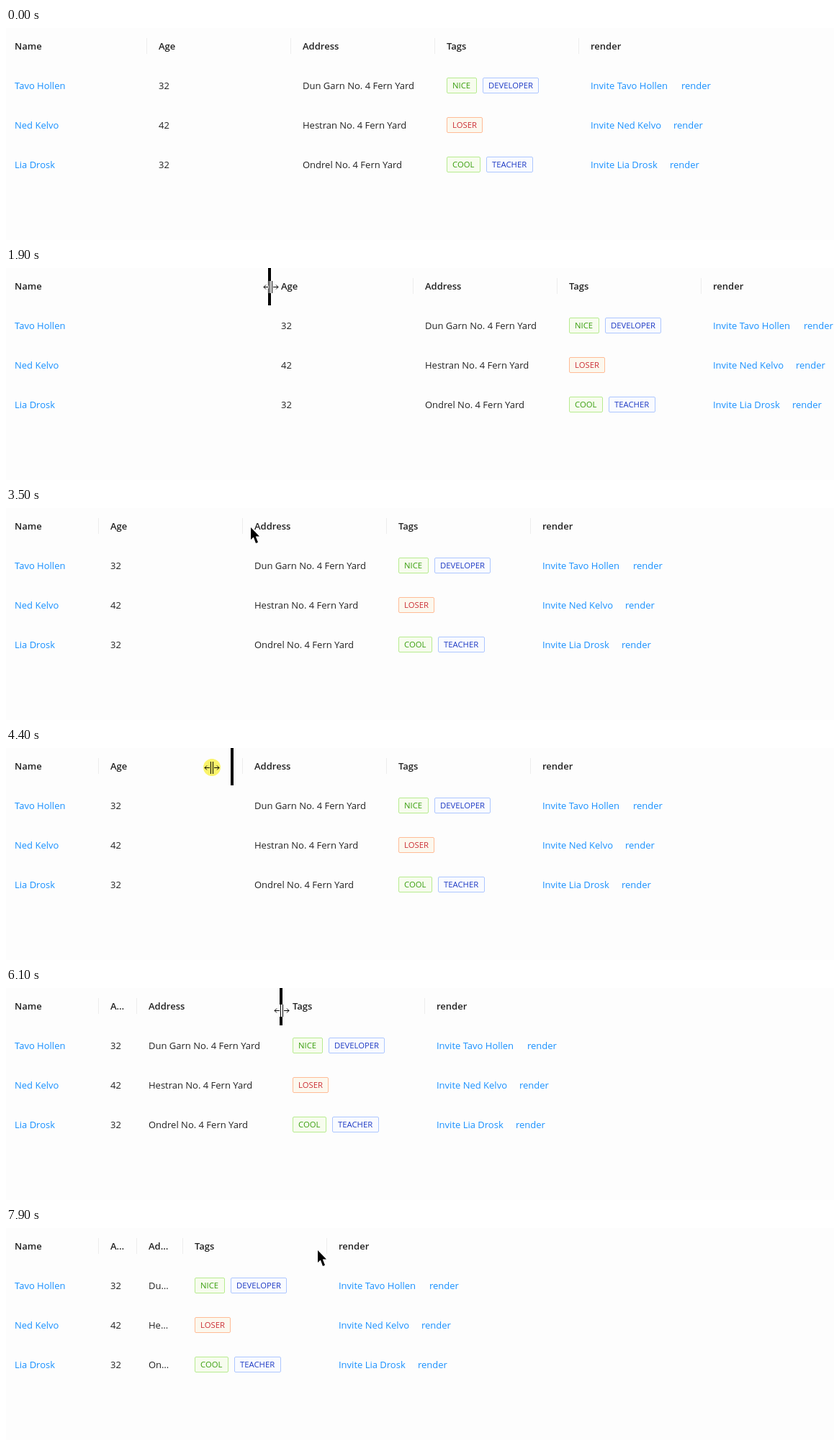
Write an HTML page that moves like this. It is 1150 px wide and 295 px high and loops after 8000 ms.

```html
<!DOCTYPE html>
<html lang="en">
<head>
<meta charset="utf-8">
<title>Resizable table columns</title>
<style>
html, body { margin: 0; width: 100%; height: 100%; overflow: hidden; background: #fdfdfd; }
body { position: relative; font: 13px/22px "Open Sans", "Noto Sans", sans-serif; color: #222; }
.column { position: absolute; top: 0; height: 100%; }
.cell { position: absolute; left: 16px; right: 16px; overflow: hidden; white-space: nowrap; text-overflow: ellipsis; }
.head { font-weight: 600; }
.column:not(:last-of-type)::after { content: ""; position: absolute; right: 0; top: 14px; width: 1px; height: 22px; background: #ededed; }
.link { color: #1890ff; }
.invite { display: inline-block; margin-right: 16px; vertical-align: top; }
.tag { display: inline-block; box-sizing: border-box; height: 22px; margin-right: 8px; padding-left: 7px; border: 1px solid; border-radius: 2px; font-size: 11.3px; line-height: 20px; vertical-align: top; }
.green { color: #389e0d; background: #f7fcee; border-color: #b7eb8f; }
.blue { color: #1d39c4; background: #f9fbff; border-color: #adc6ff; }
.red { color: #cb2f35; background: #fcf8ee; border-color: #ffbb96; }
#bar { position: absolute; top: 0; left: -2px; width: 4px; height: 52px; background: #000; }
svg { position: absolute; left: 0; top: 0; overflow: visible; }
#press { mix-blend-mode: multiply; }
</style>
</head>
<body>
<div id="table"></div>
<div id="bar"></div>
<svg id="arrow" width="1" height="1">
  <path d="M0 0V17L3.8 13.4L7 22L10 20.8L6.8 12.6H12Z" stroke="#fff" stroke-width="2" paint-order="stroke"/>
</svg>
<svg id="resize" width="1" height="1" fill="none">
  <path id="lines" d="M-1.5 -8V9M1.5 -8V9M-3 .5H-10M3 .5H10M-7 -2.5L-10 .5L-7 3.5M7 -2.5L10 .5L7 3.5"/>
  <use href="#lines" stroke="#fff" stroke-width="3"/>
  <use href="#lines" stroke="#000"/>
</svg>
<svg id="press" width="1" height="1"><circle r="12" fill="#fdf66c"/></svg>
<script>
const LOOP = 8000, STEP = 100, LAG = 65;
const ROW_TOPS = [69, 124, 179];

const rows = [
  { name: "Tavo Hollen", age: 32, address: "Dun Garn No. 4 Fern Yard", inviteWidth: 110,
    tags: [["NICE", "green", 42], ["DEVELOPER", "blue", 78]] },
  { name: "Ned Kelvo", age: 42, address: "Hestran No. 4 Fern Yard", inviteWidth: 99,
    tags: [["LOSER", "red", 50]] },
  { name: "Lia Drosk", age: 32, address: "Ondrel No. 4 Fern Yard", inviteWidth: 94,
    tags: [["COOL", "green", 47], ["TEACHER", "blue", 65]] }
];

const columns = [
  ["Name", r => `<span class="link">${r.name}</span>`],
  ["Age", r => r.age],
  ["Address", r => r.address],
  ["Tags", r => r.tags.map(([text, tone, width]) =>
    `<span class="tag ${tone}" style="width:${width}px">${text}</span>`).join("")],
  ["render", r => `<span class="link"><span class="invite" style="width:${r.inviteWidth}px">Invite ${r.name}</span>render</span>`]
];

// Column widths from the given time on
const layouts = [
  [0, [200, 200, 200, 200, 400]],
  [1900, [370, 200, 200, 200, 400]],
  [3000, [133, 200, 200, 200, 400]],
  [5000, [133, 53, 200, 200, 400]],
  [7100, [133, 53, 64, 200, 400]]
];

// Spans in which the picture moves; it holds still between them
const active = [[0, 0], [100, 400], [600, 1100], [1300, 1900], [2300, 3100], [3200, 3500],
  [3800, 4200], [4400, 4800], [5000, 5600], [5800, 5900], [6100, 6900], [7000, 7900]];

// Pointer: time, x, y, mode
const path = [
  [0, 901, 226, "none"], [100, 901, 226, "arrow"], [200, 612, 110, "arrow"],
  [300, 73, 52, "arrow"], [400, 205, 45, "arrow"],
  [600, 197, 27, "hover"], [700, 197, 27, "drag"], [800, 204, 27, "drag"],
  [900, 228, 27, "drag"], [1000, 270, 27, "drag"], [1100, 323, 27, "drag"],
  [1300, 340, 27, "drag"], [1600, 362, 26, "drag"], [1800, 368, 26, "drag"], [1900, 368, 26, "hover"],
  [2300, 368, 26, "drag"], [2400, 352, 25, "drag"], [2600, 240, 23, "drag"],
  [2800, 130, 22, "drag"], [3000, 130, 22, "hover"],
  [3200, 150, 26, "arrow"], [3500, 340, 27, "arrow"],
  [3800, 334, 27, "hover"], [4000, 330, 27, "hover"], [4200, 330, 27, "drag"], [4300, 330, 27, "drag"],
  [4400, 286, 27, "drag"], [4600, 205, 28, "drag"], [4800, 183, 28, "drag"], [5000, 184, 28, "hover"],
  [5200, 220, 30, "arrow"], [5600, 402, 38, "arrow"], [5900, 390, 33, "arrow"],
  [6100, 383, 31, "hover"], [6300, 383, 31, "drag"], [6500, 340, 31, "drag"], [6700, 268, 31, "drag"],
  [6800, 252, 31, "drag"], [6900, 243, 31, "drag"], [7000, 247, 31, "drag"], [7100, 247, 31, "hover"],
  [7300, 262, 31, "arrow"], [7800, 419, 31, "arrow"], [7900, 433, 31, "arrow"]
];

const byId = id => document.getElementById(id);
const lastBefore = (list, t) => list.findLast(item => item[0] <= t) || list[0];

const cell = (top, content, extra = "") => `<div class="cell ${extra}" style="top:${top}px">${content}</div>`;
byId("table").innerHTML = columns.map(([title, render]) =>
  `<div class="column">${cell(14, title, "head")}${rows.map((r, i) => cell(ROW_TOPS[i], render(r))).join("")}</div>`
).join("");
const columnEls = [...document.querySelectorAll(".column")];

function pointerAt(t) {
  const from = lastBefore(path, t);
  const to = path[path.indexOf(from) + 1] || from;
  const k = to === from ? 0 : (t - from[0]) / (to[0] - from[0]);
  return { x: from[1] + (to[1] - from[1]) * k, y: from[2] + (to[2] - from[2]) * k, mode: from[3] };
}

function place(id, visible, x, y) {
  const el = byId(id);
  el.style.visibility = visible ? "visible" : "hidden";
  el.style.transform = `translate(${Math.round(x)}px, ${Math.round(y)}px)`;
}

function layOut(widths) {
  let edge = -4;
  return widths.map((width, i) => {
    columnEls[i].style.left = edge + "px";
    columnEls[i].style.width = width + "px";
    return edge += width;
  });
}

function draw(time) {
  const span = lastBefore(active, time);
  const t = Math.min(Math.floor(time / STEP) * STEP, span[1]);
  const edges = layOut(lastBefore(layouts, t)[1]);
  const { x, y, mode } = pointerAt(t);
  const dragging = mode === "drag", onHandle = dragging || mode === "hover";
  const nearest = edges.reduce((a, b) => Math.abs(b - x) < Math.abs(a - x) ? b : a);
  place("bar", onHandle, dragging ? pointerAt(t - LAG).x - 1 : nearest, 0);
  place("arrow", mode === "arrow", x, y);
  place("resize", onHandle, x, y);
  place("press", dragging, x, y);
}

const start = performance.now();
function tick() {
  draw((performance.now() - start) % LOOP);
  requestAnimationFrame(tick);
}
tick();
</script>
</body>
</html>
```
